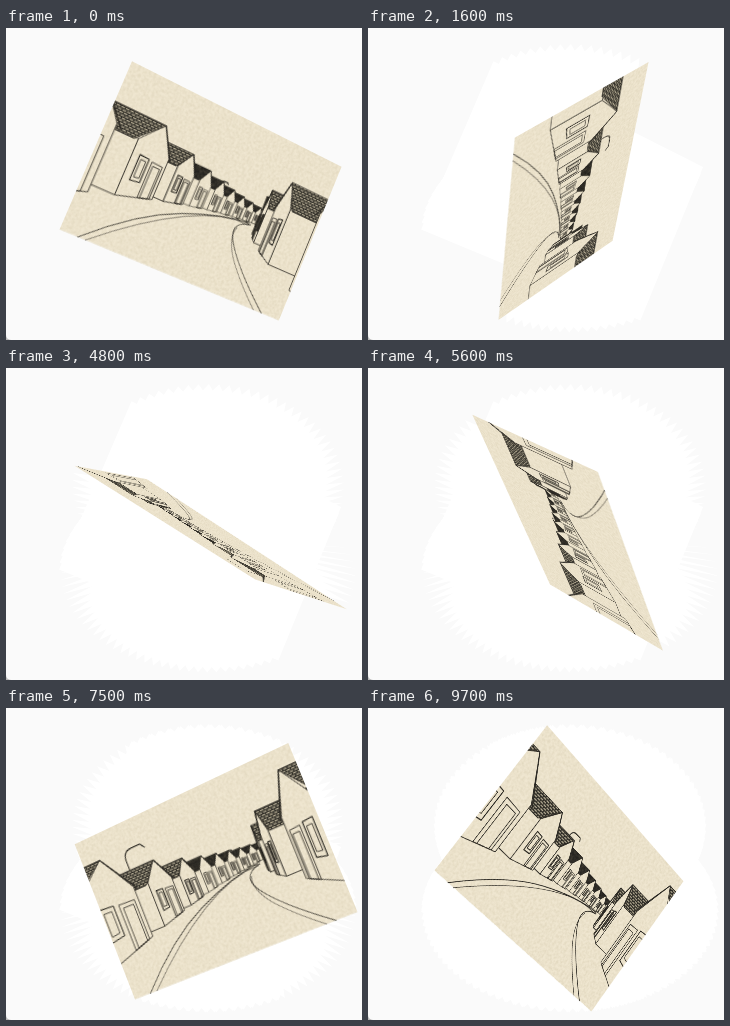
An HTML page with a canvas for the animation above (9.8 s loop, 356x312 px).

```html
<!DOCTYPE html>
<html lang="en">
<head>
<meta charset="utf-8">
<title>Turning street drawing</title>
<style>
  html, body { margin: 0; width: 100%; height: 100%; overflow: hidden; background: #bbb; }
  #stage { position: relative; width: 356px; height: 312px; overflow: hidden;
    perspective: 1000px; perspective-origin: 202px 168.4px; }
  #trail { position: absolute; left: 0; top: 0; background: #fafafa; border-bottom-left-radius: 5px; }
  #card { position: absolute; left: 74.5px; top: 81.1px; overflow: hidden; }
</style>
</head>
<body>
<div id="stage">
  <canvas id="trail" width="356" height="312"></canvas>
  <svg id="card" width="255" height="174.6" viewBox="0 0 255 174.6">
    <defs>
      <pattern id="tiles" width="5" height="5" patternUnits="userSpaceOnUse">
        <rect width="5" height="5" fill="#2b2924"/>
        <path d="M.6 1.2h3.6M-1.9 3.7h3.6M3.1 3.7h3.6" stroke="#b3aa94" stroke-width="1.2"/>
      </pattern>
      <filter id="grain" x="0" y="0" width="1" height="1">
        <feTurbulence type="fractalNoise" baseFrequency=".35" numOctaves="2" seed="4"/>
        <feColorMatrix values="0 0 0 0 .45  0 0 0 0 .38  0 0 0 0 .22  .4 0 0 0 -.13"/>
      </filter>
    </defs>
    <rect width="255" height="174.6" fill="#efe6d0"/>
    <g id="street" fill="none" stroke="#25231f" stroke-linejoin="round"></g>
    <rect width="255" height="174.6" filter="url(#grain)"/>
  </svg>
</div>
<script>
const PAPER = '#efe6d0', INK = '#25231f', HORIZON = 86;
const HALF_W = 127.5, HALF_H = 87.3, CENTER_X = 202, CENTER_Y = 168.4, DEPTH = 1000;
const LOOP = 9800, STEP = 100;

// The street: house spacing in depth, houses passed per second, one lamp per four houses
const SPACING = .52, PACE = 1.407, LAMP_EVERY = 4, FIRST = .95;
const EAVE = -20, RIDGE = -50, GROUND = 36;
const left = { middle: 136.8, spread: -109, bend: 15.2, depth: .36, wing: -80, count: 9 };
const right = { middle: 98, spread: 91, bend: 22.3, depth: .26, wing: 80, count: 4 };

// Projects a point of a row's street-side wall; dx shifts it sideways
const at = (row, z, y, dx = 0) =>
  [row.middle + (row.spread + dx) / z + row.bend * z, HORIZON + y / z];

const path = (d, fill = 'none', width = .8) =>
  `<path d="${d}" fill="${fill}" stroke-width="${width}"/>`;
const line = points => 'M' + points.map(p => p.map(v => v.toFixed(1)).join(' ')).join('L');
const shape = (points, fill, width) => path(line(points) + 'Z', fill, width);

function house(row, z) {
  const { depth, wing } = row, mid = z + depth / 2, back = z + depth;
  const far = z > 1.8, pen = far ? .55 : .8;
  const panel = (from, to, top, bottom, width) => {
    const a = z + depth * from, b = z + depth * to;
    return shape([at(row, a, top), at(row, b, top), at(row, b, bottom), at(row, a, bottom)], 'none', width);
  };
  return shape([at(row, z, EAVE, wing), at(row, z, EAVE), at(row, z, GROUND), at(row, z, GROUND, wing)], PAPER, pen) +
    shape([at(row, z, EAVE), at(row, mid, RIDGE), at(row, back, EAVE), at(row, back, GROUND), at(row, z, GROUND)], PAPER, pen) +
    shape([at(row, mid, RIDGE, wing), at(row, mid, RIDGE), at(row, z - .03, EAVE + 2), at(row, z - .03, EAVE + 2, wing)],
      far ? INK : 'url(#tiles)', pen) +
    path(line([at(row, mid, RIDGE), at(row, back + .03, EAVE + 2)]), 'none', pen * 1.7) +
    panel(.17, .43, -8, 19, pen * 1.4) + panel(.23, .37, -4, 15, pen) +
    panel(.53, .9, -7, GROUND, pen) + panel(.6, .84, -3, GROUND, pen);
}

function lamp(z) {
  const [x, y] = at(left, z, -31, 44), r = 7 / z;
  return path(`M${x} ${HORIZON}V${y}q0 ${-r} ${r} ${-r}h${r}l${r * .4} ${r * .5}`, 'none', 1.1);
}

const curbs =
  path('M19 175Q66 131 108 114T181 95', 'none', .9) +
  path('M27 175Q72 136 112 115.500T181 97', 'none', .6) +
  path('M183 96C166 99 163 108 174 122Q190 143 233 175', 'none', .9) +
  path('M170 104C166 112 170 125 184 140Q200 157 223 175', 'none', .6);

function streetAt(seconds) {
  const passed = seconds * PACE;
  const row = (side, ahead) => {
    let out = '';
    for (let i = side.count; i >= -1; i--) {
      const z = FIRST + ahead + SPACING * (i - passed % 1);
      if (z > .15) out += house(side, z);
    }
    return out;
  };
  const lampZ = FIRST + SPACING * (2 - passed % LAMP_EVERY);
  const lamps = [lampZ + SPACING * LAMP_EVERY, lampZ].filter(z => z > .3).map(lamp).join('');
  return curbs + lamps + row(left, 0) + row(right, -.04);
}

const card = document.getElementById('card');
const street = document.getElementById('street');
const ctx = document.getElementById('trail').getContext('2d');
const corners = [[-1, -1], [1, -1], [1, 1], [-1, 1]];
const angleAt = step => 33 + 39.4 * step * STEP / 1000;

function addPatch(step) {
  const turn = new DOMMatrix().rotateAxisAngle(0, 1, 1, angleAt(step));
  ctx.beginPath();
  for (const [sx, sy] of corners) {
    const p = turn.transformPoint({ x: sx * HALF_W, y: sy * HALF_H });
    const k = DEPTH / (DEPTH - p.z);
    ctx.lineTo(CENTER_X + p.x * k, CENTER_Y + p.y * k);
  }
  ctx.fill();
}

let shown = -1;
function draw() {
  const step = Math.floor(performance.now() % LOOP / STEP);
  if (step !== shown) {
    shown = step;
    card.style.transform = `rotate3d(0, 1, 1, ${angleAt(step)}deg)`;
    street.innerHTML = streetAt(step * STEP / 1000);
    // every earlier pose leaves a white patch until the loop restarts
    ctx.clearRect(0, 0, 356, 312);
    ctx.fillStyle = '#fff';
    for (let i = 0; i < step; i++) addPatch(i);
  }
  requestAnimationFrame(draw);
}
draw();
</script>
</body>
</html>
```
